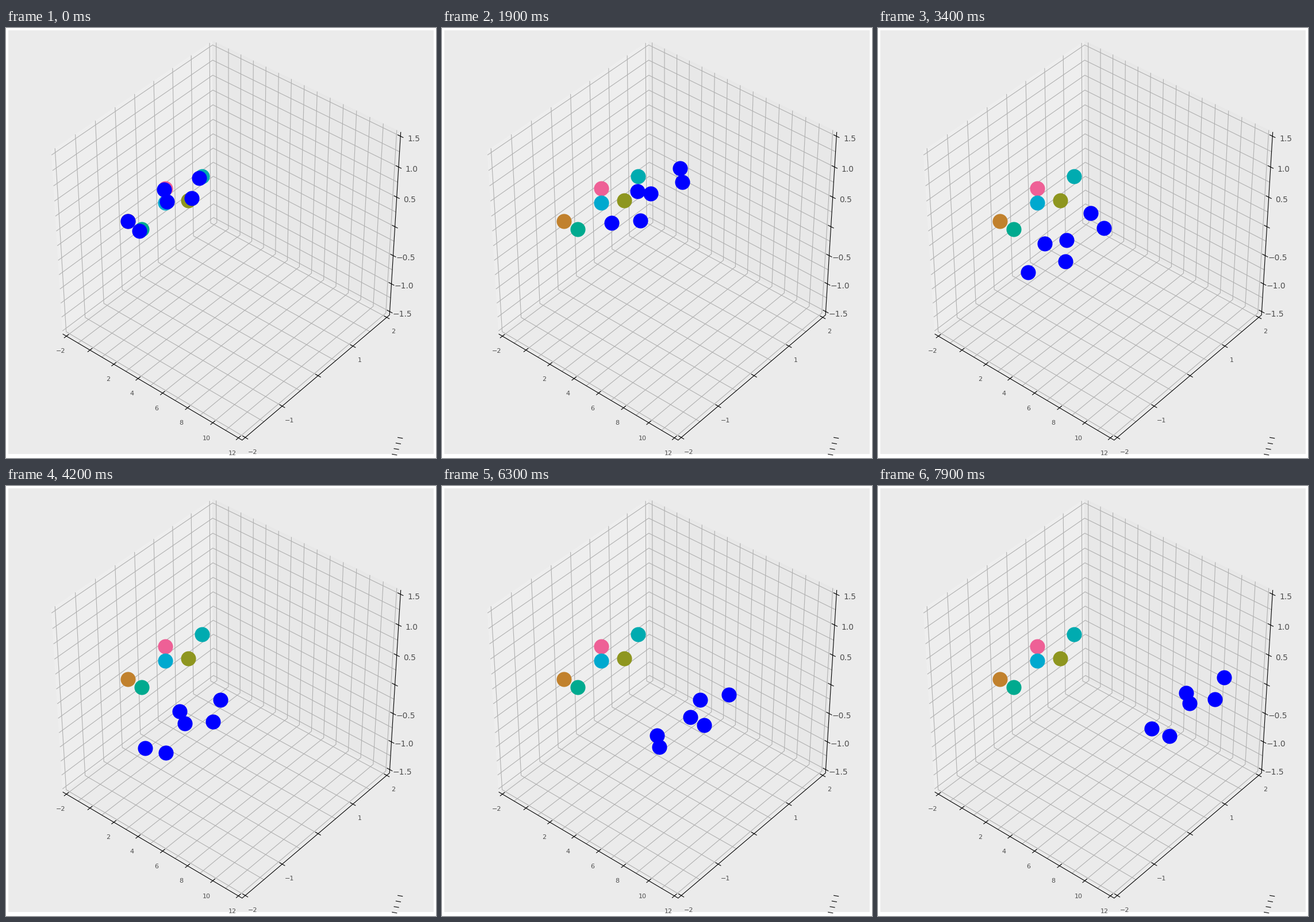
These frames come from a looping animation (748 by 748 pixels, 8000 ms). A matplotlib script:

```python
import numpy as np
import matplotlib.pyplot as plt
from matplotlib.animation import FuncAnimation
from matplotlib.patches import Polygon, Rectangle

SIZE, DPI = 748, 100
FRAMES, INTERVAL = 80, 100

LO = np.array([-2, -2, -1.5])
SPAN = np.array([14, 4, 3])
E = 1 / 48                      # pane margin in unit-cube terms
A, B = -E, 1 + E

# Camera: elevation 40, azimuth -50, distance 10
el, az = np.radians([40, -50])
TOWARD = np.array([np.cos(az) * np.cos(el), np.sin(az) * np.cos(el), np.sin(el)])
RIGHT = np.array([-np.sin(az), np.cos(az), 0])
UP = np.cross(TOWARD, RIGHT)


def project(cube):
    """Unit-cube points to stage pixels and depth."""
    p = np.asarray(cube, float) - 0.5
    depth = 10 - p @ TOWARD
    return 384.5 + 4000 * (p @ RIGHT) / depth, 362 - 3984 * (p @ UP) / depth, depth


def to_cube(data):
    return (np.asarray(data, float) - LO) / SPAN


fig = plt.figure(figsize=(SIZE / DPI, SIZE / DPI), dpi=DPI, facecolor="white")
ax = fig.add_axes([0, 0, 1, 1])
ax.set_xlim(0, SIZE)
ax.set_ylim(SIZE, 0)
ax.axis("off")
ax.add_patch(Rectangle((4, 4), 740, 737, fc="#ebebeb", lw=0, zorder=0))


def path(points, color, lw=0.8, z=2):
    x, y, _ = project(points)
    ax.plot(x, y, color=color, lw=lw, zorder=z)


def pane(corners, shade):
    x, y, _ = project(corners)
    ax.add_patch(Polygon(np.c_[x, y], fc=str(shade), ec=str(shade), lw=1, alpha=0.5, zorder=1))


def label(x, y, text, size):
    text = text.replace("-", "\u2212")
    drop = 0.365 * size * DPI / 72
    ax.text(x, y + drop, text, size=size, color="0.3", family="DejaVu Sans",
            ha="center", va="baseline", zorder=4)


pane([(A, A, A), (A, B, A), (A, B, B), (A, A, B)], 0.95)
pane([(A, B, A), (B, B, A), (B, B, B), (A, B, B)], 0.9)
pane([(A, A, A), (B, A, A), (B, B, A), (A, B, A)], 0.925)

GRID = "#b0b0b0"
for u in np.linspace(0, 1, 15):
    path([(u, A, A), (u, B, A), (u, B, B)], GRID)
for v in np.linspace(0, 1, 9):
    path([(B, v, A), (A, v, A), (A, v, B)], GRID)
for w in np.linspace(0, 1, 13):
    path([(A, A, w), (A, B, w), (B, B, w)], GRID)

path([(A, A, A), (B, A, A), (B, B, A), (B, B, B)], "black", z=3)


def ticks(values, axis, base, across, shift, size, fmt):
    """Tick marks and labels along one axis; zero stays unlabelled."""
    half = np.zeros(3)
    half[across] = 0.014
    for val in values:
        p = np.array(base, float)
        p[axis] = (val - LO[axis]) / SPAN[axis]
        path([p + half, p - half], "black", z=3)
        if val:
            x, y, d = project(p)
            label(x + shift[0] / d, y + shift[1] / d, fmt % val, size)


ticks(range(-2, 13, 2), 0, (0, A, A), 1, (-104, 254), 8, "%d")
ticks(range(-2, 3), 1, (B, 0, A), 0, (122, 244), 8, "%d")
ticks(np.arange(-1.5, 2, 0.5), 2, (B, B, 0), 0, (226, 34), 10, "%.1f")

# Stray tick marks in the lower right corner
for k in range(4):
    x, y = 685.7 - 3.3 * k, 713 + 9.7 * k
    ax.plot([x - 4, x + 4], [y - 0.7, y + 0.7], color="black", lw=0.8, zorder=3)

# Formation: a hub and a pentagon of radius 1
PHASE = np.radians([18, 90, 162, 234, 306])
COLORS = ["#8e961f", "#00abb0", "#ee6096", "#c1812d", "#00aa8f", "#00a9cf"]
HEIGHT = np.array([0.02, 0, -0.022, -0.043, 0.058, 0.057])
KICK = np.array([0.09, -0.08, -0.035, 0, -0.06, 0.045])


def ring(angle):
    pts = np.zeros((6, 3))
    pts[:5, 0] = np.cos(PHASE + angle)
    pts[:5, 1] = np.sin(PHASE + angle)
    return pts


def swarm(t):
    """Drift along x, sway along y and spin, each starting from rest."""
    fade = np.exp(-4 * t)
    pts = ring(t - 0.3 + (0.3 + 0.2 * t) * fade)
    pts[:, 0] += 4 * t / 3 - 0.573 + (0.573 + 0.96 * t) * fade
    pts[:, 1] += np.sin(t) - 0.258 + (0.258 + 0.03 * t) * fade + KICK * fade
    pts[:, 2] += HEIGHT * (1 - fade)
    return pts


DOT = dict(ls="", marker="o", ms=18.8, mew=0)
hx, hy, _ = project(to_cube(ring(0)))
for x, y, c in zip(hx, hy, COLORS):
    ax.plot([x], [y], color=c, zorder=5, **DOT)
movers, = ax.plot([], [], color="blue", zorder=6, **DOT)


def update(i):
    x, y, _ = project(to_cube(swarm(i * INTERVAL / 1000)))
    movers.set_data(x, y)
    return movers,


anim = FuncAnimation(fig, update, frames=FRAMES, interval=INTERVAL, repeat=True, repeat_delay=0)
plt.show()
```
